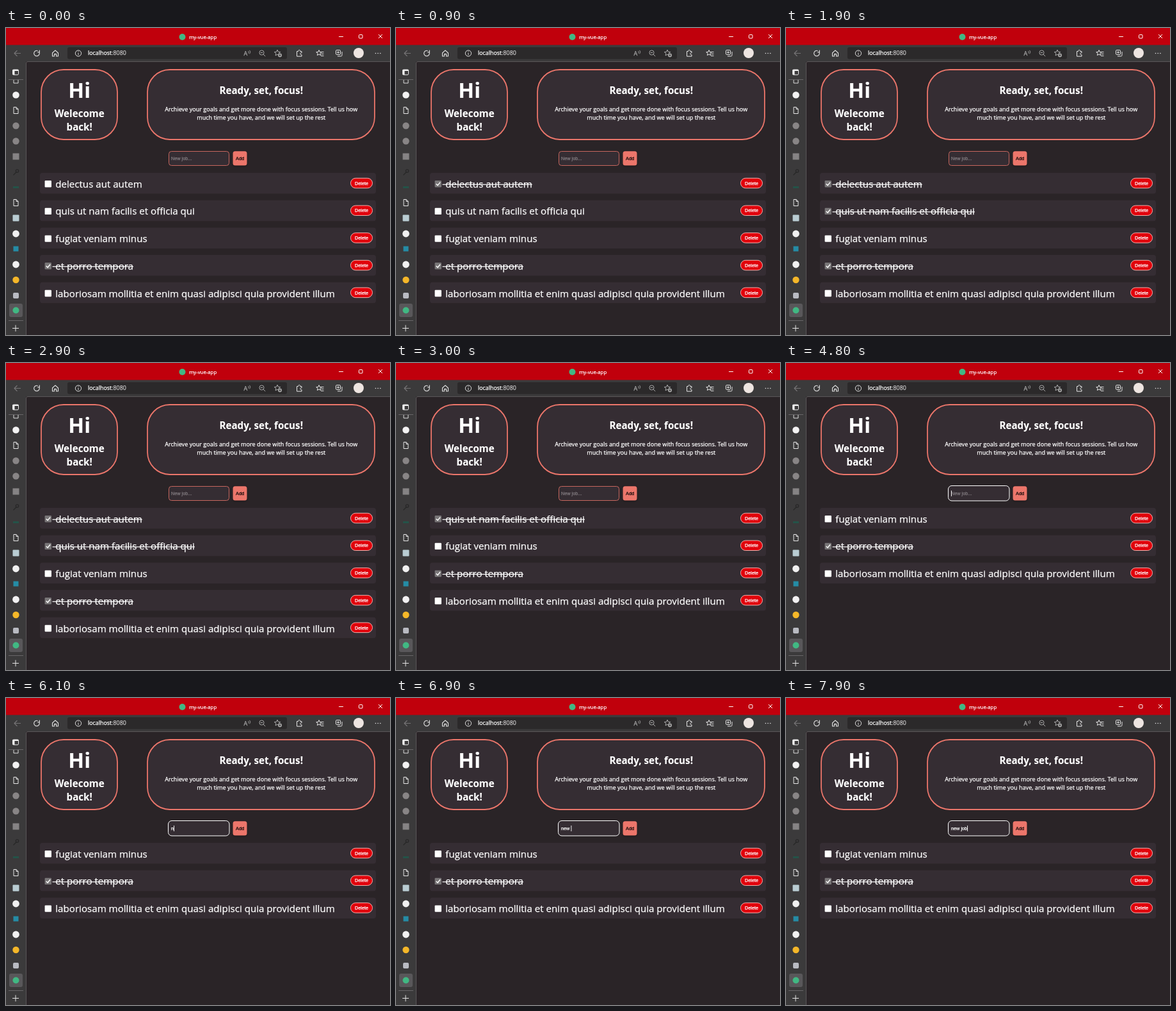
An HTML page with a canvas for the animation above (8 s loop, 600 by 479 pixels).

```html
<!DOCTYPE html>
<html lang="en">
<head>
<meta charset="utf-8">
<title>my-vue-app</title>
<style>
html, body { margin: 0; width: 100%; height: 100%; overflow: hidden; background: #2a2427; }
canvas { display: block; }
</style>
</head>
<body>
<canvas id="stage" width="600" height="479"></canvas>
<script>
const ctx = document.getElementById('stage').getContext('2d');
const LOOP = 8000;
const SANS = '"Open Sans", "Noto Sans", sans-serif';
const ARIAL = '"Liberation Sans", Arial, sans-serif';
const SALMON = '#ec766b', PANEL = '#352d33', PAGE = '#2a2427', CHROME = '#3b3a3b', GREEN = '#41b883';

const T = { check1: 900, check2: 1900, delete1: 3000, delete2: 3800, focus: 4800 };
const KEYS = [6100, 6500, 6700, 6900, 7200, 7300, 7500];
const TYPED = 'new job';

const jobs = [
  { text: 'delectus aut autem', done: T.check1, gone: T.delete1 },
  { text: 'quis ut nam facilis et officia qui', done: T.check2, gone: T.delete2 },
  { text: 'fugiat veniam minus', done: Infinity, gone: Infinity },
  { text: 'et porro tempora', done: 0, gone: Infinity },
  { text: 'laboriosam mollitia et enim quasi adipisci quia provident illum', done: Infinity, gone: Infinity }
];

function rect(x, y, w, h, color) {
  ctx.fillStyle = color;
  ctx.fillRect(x, y, w, h);
}

function paint(fill, stroke, width) {
  if (fill) { ctx.fillStyle = fill; ctx.fill(); }
  if (stroke) { ctx.strokeStyle = stroke; ctx.lineWidth = width; ctx.stroke(); }
}

function round(x, y, w, h, r, fill, stroke, width = 1) {
  ctx.beginPath();
  ctx.roundRect(x, y, w, h, r);
  paint(fill, stroke, width);
}

function disc(x, y, r, fill, stroke, width = 1) {
  ctx.beginPath();
  ctx.arc(x, y, r, 0, Math.PI * 2);
  paint(fill, stroke, width);
}

function path(d, color, width = 1) {
  ctx.strokeStyle = color;
  ctx.lineWidth = width;
  ctx.stroke(new Path2D(d));
}

// A hairline stroke gives the text the firm look of hinted screen type.
function label(str, x, y, size, { color = '#fff', family = SANS, align = 'left', weight = 400 } = {}) {
  ctx.font = `${weight} ${size}px ${family}`;
  ctx.textAlign = align;
  ctx.fillStyle = ctx.strokeStyle = color;
  ctx.lineWidth = weight > 400 ? 0.1 : 0.25;
  ctx.lineJoin = 'round';
  ctx.fillText(str, x, y);
  ctx.strokeText(str, x, y);
}

function star(x, y, r, color) {
  ctx.beginPath();
  for (let i = 0; i < 10; i++) {
    const a = i * Math.PI / 5 - Math.PI / 2, d = i % 2 ? r * 0.45 : r;
    ctx.lineTo(x + d * Math.cos(a), y + d * Math.sin(a));
  }
  ctx.closePath();
  paint(null, color, 1);
}

function sheet(y) {
  path(`M12 ${y - 5}h4l3 3v7h-7zM16 ${y - 5}v3h3`, '#e8e8e8');
}

function titleBar() {
  rect(0, 0, 600, 27, '#c0000c');
  disc(275.5, 14, 5, GREEN);
  label('my-vue-app', 286, 16.5, 7.8);
  path('M520 13.5h7M582 10l6 6M588 10l-6 6', '#fff');
  round(551.5, 10.5, 5.5, 5.5, 1, null, '#fff');
}

function toolbar() {
  const light = '#e4e4e4', dim = '#aaa';
  rect(0, 26.5, 600, 26, CHROME);
  path('M23 39.5h-10M17.5 35l-4.5 4.5l4.5 4.5', '#757475', 1.1);

  ctx.beginPath();
  ctx.arc(48, 39.5, 4.3, -0.5, 5.1);
  paint(null, light, 1.1);
  path('M52.3 34.5v3.2h-3.2', light, 1.1);
  path('M72.5 39l4.5-4.2l4.5 4.2v5h-3v-3.4h-3v3.4h-3z', light, 1.1);

  round(96, 30, 343, 18.5, 3, '#2b292a');
  disc(113, 39.5, 4.6, null, light);
  path('M113 39v3M113 36.6v1', light);
  label('localhost', 128, 42.4, 8.9);
  const port = 128 + ctx.measureText('localhost').width;
  label(':8080', port, 42.4, 8.9, { color: '#c4c2c3' });

  label('A', 371.5, 43.3, 9, { color: dim });
  path('M378.5 36q1.5 1.5 0 3.5M380.5 34.8q2.5 2.5 0 5.5', dim, 0.9);
  disc(399.5, 38.5, 3.6, null, dim);
  path('M402.2 41.2l3 3M397.7 38.5h3.6', dim);
  star(424, 39, 5, dim);
  disc(428, 42.5, 3, dim);
  path('M426.3 42.5h3.4M428 40.8v3.4', '#2b292a', 0.8);

  path('M454.5 36.5h2.2a1.6 1.6 0 1 1 3 0h2.3v2.3a1.6 1.6 0 1 0 0 3v2.4h-7.5z', light);
  star(489, 39, 4.5, light);
  path('M491.5 37.5h5M492.5 40.5h4M492 43.5h4.5', light);
  round(515.5, 34.5, 7, 7, 1.3, null, light);
  path('M518 44h5.5q1.5 0 1.5-1.5v-5.5M519 36v4M517 38h4', light);
  disc(551, 39, 8, '#eee5e1');
  for (let x = 577.5; x < 586; x += 3.7) disc(x, 39.5, 0.8, light);
}

function sidebar() {
  rect(0, 52, 31, 427, CHROME);
  path('M31.5 479V55q0-2.5 2.5-2.5H600', '#5a5658');
  round(10.5, 65, 9, 8, 1.5, null, '#eee');
  rect(10.5, 65, 3, 8, '#eee');
  rect(10.5, 65, 9, 2, '#eee');
  rect(4, 80, 23, 1, '#686668');
  path('M12 81v5h7v-5', '#ddd');

  disc(15.5, 104.5, 5.3, '#f3f3f3');
  sheet(128.5);
  disc(15.5, 152.5, 5.2, '#888586');
  disc(15.5, 176.5, 5.2, '#888586');
  rect(10.5, 195.5, 10, 10, '#858384');
  path('M11.5 229.5l5-5', '#292829', 1.5);
  disc(17.5, 223, 2.2, null, '#292829', 1.3);
  rect(11, 247, 9, 3, '#245348');
  sheet(272.5);
  round(10.5, 291.5, 10, 10, 1, '#b9cdd3');
  disc(15.5, 321, 5.4, '#f1f1f1');
  rect(11.5, 340.5, 8, 8, '#258ca5');
  disc(15.5, 369, 5.4, '#f1f1f1');
  disc(15.5, 393, 5.2, '#f4b729');
  round(11, 413, 9, 9, 2, '#b8bac1');

  round(5, 430, 21, 21, 3, '#59575a');
  disc(15.5, 440.5, 5, GREEN);
  rect(4, 456, 23, 1, '#686668');
  path('M10 468.5h10M15 463.5v10', '#e3e3e3');
}

function cards() {
  round(55, 65, 119, 109, 35, PANEL, SALMON, 1.8);
  round(221, 65, 355, 109, 35, PANEL, SALMON, 1.8);
  const mid = (str, x, y, size, weight) => label(str, x, y, size, { align: 'center', weight });
  mid('Hi', 114.7, 109.2, 32.5, 700);
  mid('Welecome', 114.7, 139.2, 15.2, 700);
  mid('back!', 114.7, 160.4, 15.2, 700);
  mid('Ready, set, focus!', 398.7, 103.2, 15.2, 700);
  mid('Archieve your goals and get more done with focus sessions. Tell us how', 398.7, 130.1, 9.1);
  mid('much time you have, and we will set up the rest', 398.7, 143.2, 9.1);
}

function form(t) {
  const focused = t >= T.focus;
  if (focused) round(253.5, 191.5, 95.5, 23.5, 5.5, PANEL, '#fff');
  else round(254.5, 192.5, 94, 22, 4, PANEL, '#d96e65', 0.9);

  const hits = KEYS.filter(k => t >= k);
  const value = TYPED.slice(0, hits.length);
  label(value || 'New job...', 258, 206.2, 7.3, { color: value ? '#fff' : '#827c80', family: ARIAL });

  if (focused) {
    const last = hits.pop() || T.focus;
    const caret = 258 + (value ? ctx.measureText(value).width : 0);
    if ((t - last) % 1000 < 500) rect(caret, 199, 0.9, 9, '#fff');
  }

  ctx.save();
  ctx.shadowColor = 'rgba(0,0,0,.4)';
  ctx.shadowBlur = 3;
  ctx.shadowOffsetY = 1;
  round(354.5, 192.3, 22, 22.2, 3.5, SALMON);
  ctx.restore();
  label('Add', 365.5, 206.2, 7.3, { color: '#160c0c', family: ARIAL, align: 'center' });
}

function row(job, y, done) {
  round(53, y, 525, 32.5, 4, PANEL);
  round(60.6, y + 12, 10.4, 10.4, 1.2, done ? '#787577' : '#fff');
  if (done) path(`M62.8 ${y + 17.2}l2.3 2.4l4-5`, '#fff', 1.4);
  label(job.text, 77.3, y + 22.7, 15.11);
  if (done) rect(72.5, y + 17.6, 4.8 + ctx.measureText(job.text).width, 1.2, '#fff');
  round(538.5, y + 8.3, 34, 15.5, 7.7, '#e1000b', '#f2b3ad');
  label('Delete', 555.5, y + 18.7, 7.3, { family: ARIAL, align: 'center' });
}

function draw(t) {
  rect(0, 0, 600, 479, PAGE);
  titleBar();
  toolbar();
  sidebar();
  cards();
  form(t);
  jobs.filter(job => t < job.gone)
    .forEach((job, i) => row(job, 226 + i * 42.7, t >= job.done));
}

const start = performance.now();
function tick() {
  draw((performance.now() - start) % LOOP);
  requestAnimationFrame(tick);
}
tick();
</script>
</body>
</html>
```
